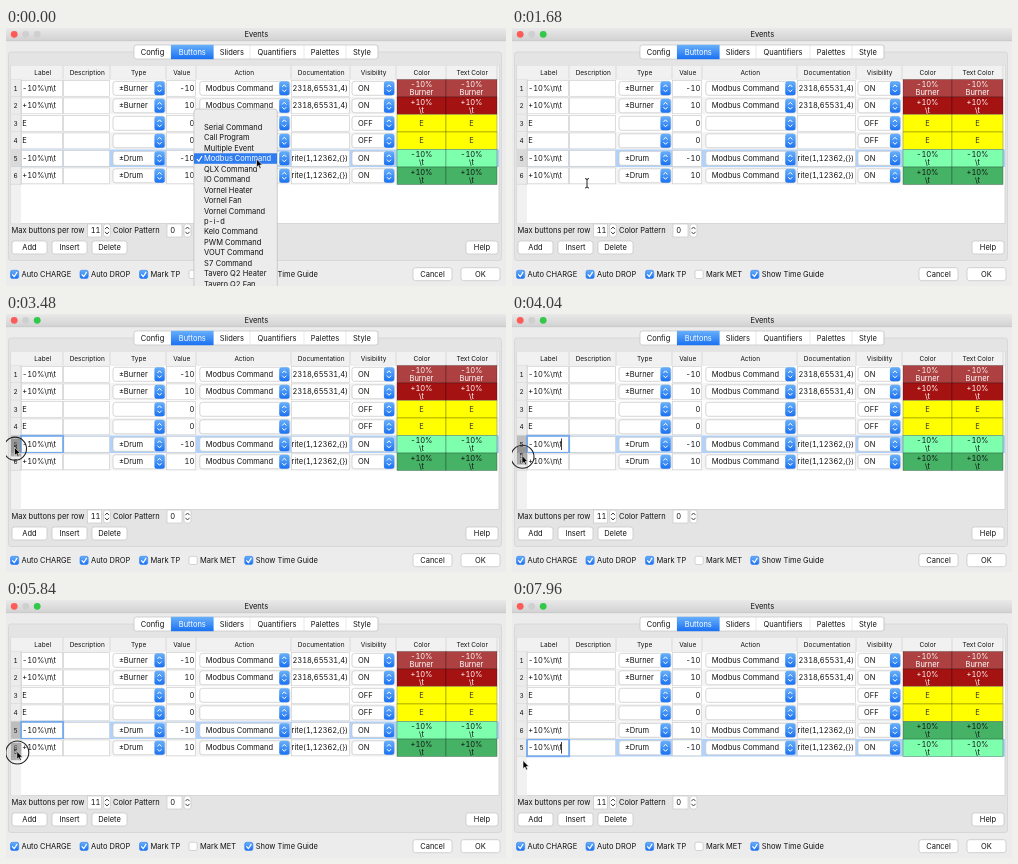
Write an HTML page that moves like this. It is 500 px wide and 258 px high and loops after 8000 ms.

```html
<!DOCTYPE html>
<html lang="en">
<head>
<meta charset="utf-8">
<title>Events</title>
<style>
html, body { margin: 0; width: 100%; height: 100%; overflow: hidden; background: #ececec; }
svg { display: block; }
text { font: 7.5px Inter, "Open Sans", sans-serif; font-variant-numeric: tabular-nums; fill: #111; white-space: pre; }
text.small { font-size: 6.5px; }
</style>
</head>
<body>
<svg id="stage" width="100%" height="100%" viewBox="0 0 500 258"></svg>
<script>
const LOOP = 8000, ROW_H = 17.5, ROWS_TOP = 51.5;
const MENU_CLOSE = 450, PRESS = 2900, SWAP = 6800;
const BLUE = '#2f7df0';

const escapeText = s => s.replace(/&/g, '&amp;').replace(/</g, '&lt;');
const rect = (x, y, w, h, fill, more = '') =>
  `<rect x="${x}" y="${y}" width="${w}" height="${h}" fill="${fill}" ${more}/>`;
const text = (x, mid, s, anchor = 'start', more = '') =>
  `<text x="${x}" y="${mid + 2.7}" text-anchor="${anchor}" ${more}>${escapeText(s)}</text>`;
const line = (d, color, width = 1) =>
  `<path d="${d}" fill="none" stroke="${color}" stroke-width="${width}" stroke-linecap="round" stroke-linejoin="round"/>`;
const chevrons = (x, y, color) =>
  line(`M${x - 1.8} ${y - 1.6}l1.8-1.9 1.8 1.9M${x - 1.8} ${y + 1.6}l1.8 1.9 1.8-1.9`, color, 1);
const edit = (x, w) => rect(x + .5, .9, w - 1, 15.9, '#fff', 'stroke="#cfcfcf" stroke-width=".7"');

function combo(x, w, label) {
  return rect(x, 1.8, w, 14, '#fff', 'rx="2.5" stroke="#c4c4c4" stroke-width=".7"') +
    rect(x + w - 10.6, 1.8, 10.3, 14, 'url(#blue)', 'rx="2.5"') +
    chevrons(x + w - 5.5, 8.8, '#fff') + text(x + 6, 8.6, label);
}

function button(x, y, w, label) {
  return rect(x, y, w, 13, '#fff', 'rx="2.5" stroke="#c2c2c2" stroke-width=".7"') +
    text(x + w / 2, y + 6.5, label, 'middle');
}

function checkbox(x, label, on) {
  return rect(x, 242.3, 8.2, 8.2, on ? 'url(#blue)' : '#fff', `rx="1.8" stroke="${on ? BLUE : '#bbb'}" stroke-width=".6"`) +
    (on ? line(`M${x + 2} 246.7l1.7 2 2.7-4.3`, '#fff', 1.2) : '') + text(x + 11, 246.2, label);
}

function spinBox(x, w, value) {
  return rect(x, 196, w, 13, '#fff', 'stroke="#c8c8c8" stroke-width=".7"') +
    text(x + 3.2, 202.5, value) +
    rect(x + w + 2, 196, 7, 13, '#fff', 'rx="2.5" stroke="#c8c8c8" stroke-width=".7"') +
    chevrons(x + w + 5.5, 202.5, '#444');
}

const COLUMNS = [
  ['Label', 15, 57], ['Description', 57, 104], ['Type', 104, 160], ['Value', 160, 190], ['Action', 190, 285],
  ['Documentation', 285, 344], ['Visibility', 344, 390], ['Color', 390, 440], ['Text Color', 440, 491]
];
const MODBUS = 'Modbus Command', MINUS = String.raw`-10%\n\t`, PLUS = String.raw`+10%\n\t`;
const ROWS = [
  [MINUS, '±Burner', '-10', MODBUS, '2318,65531,4)', 'ON', '#ad4040', '#fff', ['-10%', 'Burner']],
  [PLUS, '±Burner', '10', MODBUS, '2318,65531,4)', 'ON', '#a51212', '#fff', ['+10%', '\\t']],
  ['E', '', '0', '', '', 'OFF', '#ffff00', '#333', ['E']],
  ['E', '', '0', '', '', 'OFF', '#ffff00', '#333', ['E']],
  [MINUS, '±Drum', '-10', MODBUS, 'rite(1,12362,{})', 'ON', '#7dffae', '#111', ['-10%', '\\t']],
  [PLUS, '±Drum', '10', MODBUS, 'rite(1,12362,{})', 'ON', '#46b266', '#111', ['+10%', '\\t']]
];

function colorCell(x, w, fill, ink, lines) {
  return rect(x, 0, w, ROW_H, fill, 'stroke="#000" stroke-opacity=".4" stroke-width=".6"') + lines.map((s, i) =>
    text(x + w / 2, lines.length > 1 ? 5.2 + 7.8 * i : 8.7, s, 'middle', `style="fill:${ink}"`)).join('');
}

function tableRow([label, type, value, action, doc, visibility, fill, ink, lines], i) {
  const selected = i === 4;
  return `<g id="row${i}" transform="translate(0 ${ROWS_TOP + i * ROW_H})">` +
    rect(15, 0, 478, ROW_H, selected ? '#b1d2fb' : i % 2 ? '#f4f4f4' : '#fff') +
    rect(5, 0, 10, ROW_H, '#ececec', `id="head${i}"`) +
    line(`M5 17.3H15M15 0V17.3`, '#cfcfcf', .6) +
    text(9.6, 8.7, String(i + 1), 'middle', 'class="small"') +
    edit(15, 42) + edit(57, 47) + edit(160, 30) + edit(285, 59) +
    text(16.3, 8.7, label) + text(188.3, 8.7, value, 'end') +
    combo(107, 52, type) + combo(193.8, 90, action) + combo(346, 42.5, visibility) +
    `<svg x="286" y="0" width="57" height="17">${text(56, 8.7, doc, 'end')}</svg>` +
    colorCell(391, 49, fill, ink, lines) + colorCell(440, 51, fill, ink, lines) +
    (selected ? `<g id="focus">${rect(15, .3, 42.2, 17, 'none', 'stroke="#74abf0" stroke-width="1.8"')}` +
      rect(49, 3, .8, 11.5, '#111', 'id="caret"') + '</g>' : '') + '</g>';
}

const TABS = [['Config', 128, 165], ['Buttons', 165, 207.6], ['Sliders', 207.6, 244], ['Quantifiers', 244, 298],
  ['Palettes', 298, 340], ['Style', 340, 372]];
const tabs = rect(128, 17, 244, 14, '#fff', 'rx="2.5" stroke="#c2c2c2" stroke-width=".7"') +
  TABS.map(([name, a, b], i) => (i === 1 ? rect(a, 16.8, b - a, 14.4, 'url(#blue)') : line(`M${b} 17.5V30.5`, '#d0d0d0', .5)) +
    text((a + b) / 2, 23.8, name, 'middle', i === 1 ? 'style="fill:#fff"' : '')).join('');

const header = rect(5, 37.5, 488, 158, '#fff', 'stroke="#cccccc" stroke-width=".7"') +
  rect(5, 37.5, 488, 14, '#f1f1f1') + rect(5, 51.5, 10, 144, '#f1f1f1') + line('M5 51.4H493', '#cccccc', .6) +
  COLUMNS.map(([name, a, b]) => text((a + b) / 2 + .7, 44.7, name, 'middle', 'class="small"') +
    line(`M${b} 38V51`, '#cccccc', .6)).join('');

const MENU = ['', 'Serial Command', 'Call Program', 'Multiple Event', MODBUS, 'QLX Command', 'IO Command',
  'Vornel Heater', 'Vornel Fan', 'Vornel Command', 'p-i-d', 'Kelo Command', 'PWM Command', 'VOUT Command',
  'S7 Command', 'Tavero Q2 Heater', 'Tavero Q2 Fan'];
const menuY = i => 88.6 + 10.47 * i;
const menu = `<g id="menu">${rect(187.9, 81, 83.4, 190, '#ececec', 'rx="3" stroke="#bdbdbd" stroke-width=".7"')}` +
  rect(188, 0, 83, 10.5, BLUE, 'id="menuBar"') +
  MENU.map((s, i) => text(198, menuY(i), s, 'start', `id="item${i}"`)).join('') +
  `<path id="tick" d="M191 131l1.8 2.3 3.2-5.3" fill="none" stroke-width="1.2"/></g>`;

const light = (x, color, id) => `<circle id="${id}" cx="${x}" cy="6.3" r="3.4" fill="${color}"/>`;

const stage = document.getElementById('stage');
stage.innerHTML = `<defs>
  <linearGradient id="blue" x2="0" y2="1"><stop stop-color="#68b0fa"/><stop offset="1" stop-color="#1a71f2"/></linearGradient>
  <linearGradient id="bar" x2="0" y2="1"><stop stop-color="#e9e9e9"/><stop offset="1" stop-color="#d2d2d2"/></linearGradient>
  </defs>` +
  rect(0, 0, 500, 258, '#ececec') + rect(0, 0, 500, 12.6, 'url(#bar)') + line('M0 12.7H500', '#b9b9b9', .6) +
  light(8.2, '#fc5b57', 'close') + light(19.7, '#cfcfcf', 'minimize') + light(31.2, '#34c84a', 'zoom') +
  text(250.3, 6.6, 'Events', 'middle') +
  rect(2.5, 24, 493, 208.5, '#e4e4e4', 'rx="2.5" stroke="#d2d2d2" stroke-width=".7"') +
  tabs + header + ROWS.map(tableRow).join('') +
  text(5.5, 202.5, 'Max buttons per row') + spinBox(81.5, 14, '11') +
  text(107, 202.5, 'Color Pattern') + spinBox(161, 15, '0') +
  button(6, 213, 35, 'Add') + button(46, 213, 35, 'Insert') + button(86, 213, 35, 'Delete') + button(460, 213, 32, 'Help') +
  checkbox(4.5, 'Auto CHARGE', true) + checkbox(74, 'Auto DROP', true) + checkbox(133.5, 'Mark TP', true) +
  checkbox(183, 'Mark MET', false) + checkbox(238.7, 'Show Time Guide', true) +
  button(407, 239.7, 39, 'Cancel') + button(455, 239.7, 39, 'OK') + menu +
  `<g id="drag">${rect(5, 0, 10, ROW_H, '#777', 'opacity=".55"')}${text(9.6, 8.7, '5', 'middle', 'class="small"')}</g>
  <circle id="ring" r="11.5" fill="none" stroke="#222" stroke-width="1.1"/>
  <path id="arrow" d="M0 0V8.2L1.9 6.5 3.2 9.4 4.6 8.8 3.3 6H5.9Z" fill="#000" stroke="#fff" stroke-width=".6"/>
  <path id="beam" d="M-2-4.5Q0-4.5 0-3Q0-4.5 2-4.5M0-3V3.5M-2 5Q0 5 0 3.5Q0 5 2 5" fill="none" stroke="#111" stroke-width=".9"/>`;

const el = Object.fromEntries([...stage.querySelectorAll('[id]')].map(e => [e.id, e]));
const show = (e, on) => e.setAttribute('visibility', on ? 'visible' : 'hidden');
const move = (e, x, y) => e.setAttribute('transform', `translate(${x} ${y})`);
const clamp = v => Math.max(0, Math.min(1, v));

// Pointer stops: time, x, y
const PATH = [[0, 250.5, 131], [180, 250.5, 131], [380, 262, 142], [580, 331, 179.5], [760, 340, 184], [900, 340, 184],
  [1620, 75, 155], [1760, 75, 155], [2400, 8, 130], [3200, 8, 130.5], [4040, 10, 141.5], [4900, 10.5, 150.5],
  [5740, 10.8, 151.2], [6000, 10.8, 151.2], [6600, 11, 160.5], [LOOP, 11, 160.5]];

function pointer(t) {
  const i = PATH.findIndex((p, k) => k && t <= p[0]);
  const [t0, x0, y0] = PATH[i - 1], [t1, x1, y1] = PATH[i];
  const u = (t - t0) / (t1 - t0), k = u * u * (3 - 2 * u);
  return [x0 + (x1 - x0) * k, y0 + (y1 - y0) * k];
}

function draw(t) {
  const [x, y] = pointer(t);
  const pressed = t >= PRESS && t < SWAP, swapped = t >= SWAP;

  const opacity = 1 - clamp((t - MENU_CLOSE) / 260), picked = t < 300 ? 4 : 5;
  el.menu.setAttribute('opacity', opacity);
  show(el.menu, opacity > 0);
  el.menuBar.setAttribute('y', menuY(picked) - 5.2);
  for (const i of [4, 5]) el['item' + i].style.fill = i === picked ? '#fff' : '#111';
  el.tick.setAttribute('stroke', picked === 4 ? '#fff' : '#111');
  el.zoom.setAttribute('fill', t < MENU_CLOSE ? '#cfcfcf' : '#34c84a');

  move(el.row4, 0, ROWS_TOP + ROW_H * (swapped ? 5 : 4));
  move(el.row5, 0, ROWS_TOP + ROW_H * (swapped ? 4 : 5));
  el.head4.setAttribute('fill', pressed ? '#bdbdbd' : swapped ? '#ececec' : '#dadada');
  el.focus.setAttribute('display', t >= PRESS ? 'inline' : 'none');
  el.caret.setAttribute('display', (t - PRESS + LOOP) % 1000 < 500 ? 'inline' : 'none');

  show(el.drag, pressed);
  move(el.drag, 0, ROWS_TOP + 4 * ROW_H + y - 130);
  show(el.ring, pressed);
  move(el.ring, x + .5, y + 1.3);

  const overText = x > 16 && x < 104 && y < 157;
  show(el.arrow, !overText);
  show(el.beam, overText);
  move(el.arrow, x, y);
  move(el.beam, x, y);
}

function tick() {
  draw(performance.now() % LOOP);
  requestAnimationFrame(tick);
}
tick();
</script>
</body>
</html>
```
